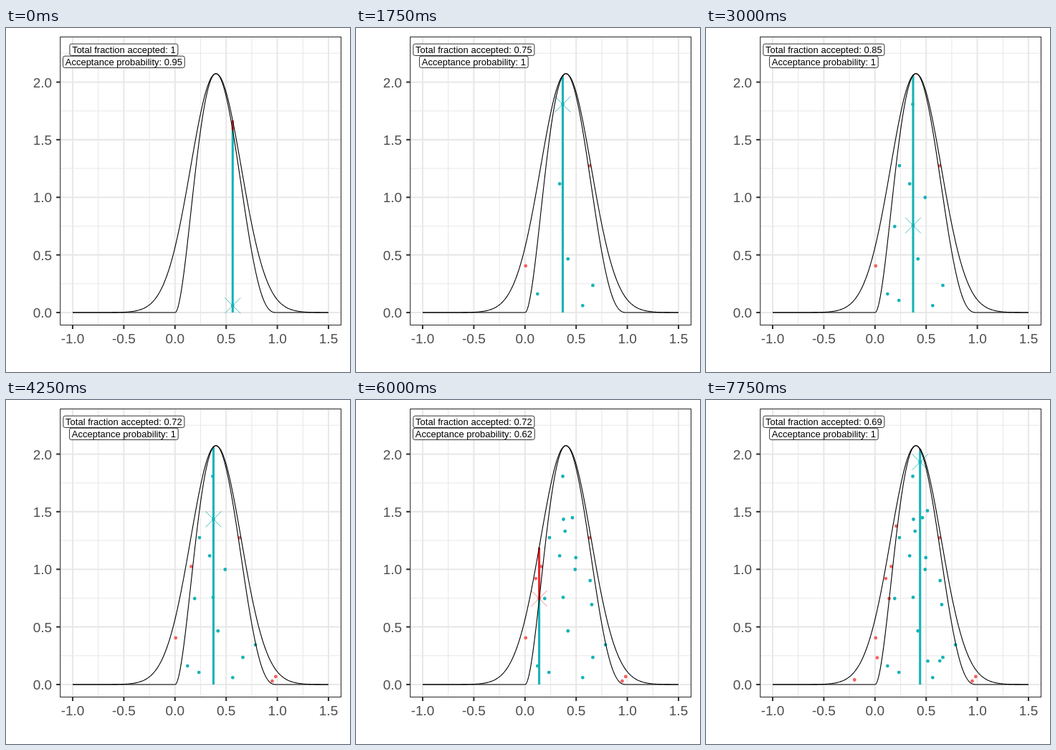
Recreate the animation shown at these times as an HTML page. Size 480 by 480 pixels, loop 8000 ms.

```html
<!DOCTYPE html>
<html lang="en">
<head>
<meta charset="utf-8">
<title>Rejection sampling</title>
<style>
  html, body { margin: 0; width: 100%; height: 100%; overflow: hidden; background: #fff; }
  svg { display: block; width: 100vw; height: 100vh; }
  text { font-family: "Liberation Sans", Arial, sans-serif; }
  .axis { font-size: 19px; fill: #4d4d4d; }
  .label { font-size: 13px; fill: #000; text-anchor: middle; }
</style>
</head>
<body>
<svg id="stage" viewBox="0 0 480 480"></svg>
<script>
const STEP = 250;
const TEAL = "#17b3b7", RED = "#f8605c", HOT = "#e8282d";
const PANEL = { x: 75.7, y: 12.5, width: 391.8, height: 402 };
const LABEL_X = 164.4;

// Proposals in order: position and height drawn under the envelope
const samples = [
  [.5637, .06], [.42, .465], [.0065, .405], [.339, 1.117],
  [.631, 1.273], [.1225, .161], [.663, .235], [.369, 1.807],
  [.2395, 1.275], [.49, .9985], [.1925, .7465], [.234, .105],
  [.3725, .756], [.159, 1.0245], [.786, .345], [.95, .03],
  [.984, .0685], [.376, 1.434], [.4635, 1.448], [.4965, 1.101],
  [.6365, .902], [.3915, 1.331], [.105, .9205], [.6525, .6935],
  [.1385, .7465], [-.2, .0405], [.0214, .233], [.633, .205],
  [.516, .2035], [.5125, 1.5085], [.208, 1.375], [.4405, 1.931]
];

const px = x => 235.8 + 142.8 * x;
const py = y => 397 - 160.75 * y;
const target = x => x > 0 && x < 1 ? 60 * x ** 2 * (1 - x) ** 3 : 0;
const envelope = x => 2.0736 * Math.exp(-((x - .4) ** 2) / .123);
const accepted = ([x, y]) => y <= target(x);

const stage = document.getElementById("stage");

function set(el, attrs) {
  for (const key in attrs) el.setAttribute(key, attrs[key]);
  return el;
}

function add(tag, attrs, parent = stage) {
  const el = document.createElementNS("http://www.w3.org/2000/svg", tag);
  return parent.appendChild(set(el, attrs));
}

function line(x1, y1, x2, y2, stroke, width) {
  return add("line", { x1, y1, x2, y2, stroke, "stroke-width": width });
}

function axisText(x, y, anchor, value) {
  add("text", { x, y, class: "axis", "text-anchor": anchor }).textContent = value.toFixed(1);
}

const left = PANEL.x, right = left + PANEL.width;
const top_ = PANEL.y, bottom = top_ + PANEL.height;
const vertical = (v, w) => line(px(v), top_, px(v), bottom, "#e8e8e8", w);
const horizontal = (v, w) => line(left, py(v), right, py(v), "#e8e8e8", w);

for (let v = -.75; v < 1.5; v += .5) vertical(v, 1.1);
for (let v = .25; v < 2.5; v += .5) horizontal(v, 1.1);
for (let v = -1; v <= 1.5; v += .5) {
  vertical(v, 2.1);
  line(px(v), bottom, px(v), bottom + 5.5, "#333", 2.1);
  axisText(px(v), 440, "middle", v);
}
for (let v = 0; v <= 2; v += .5) {
  horizontal(v, 2.1);
  line(left - 5.5, py(v), left, py(v), "#333", 2.1);
  axisText(64.2, py(v) + 7, "end", v);
}

const dots = samples.map(s => add("circle", {
  cx: px(s[0]), cy: py(s[1]), r: 2.4, fill: accepted(s) ? TEAL : RED
}));
const keepBar = line(0, 0, 0, 0, TEAL, 3.1);
const dropBar = line(0, 0, 0, 0, HOT, 3.1);
const cross = add("path", { fill: "none", "stroke-width": 1, "stroke-opacity": .8 });

function curve(fn) {
  let d = "";
  for (let i = 0; i <= 500; i++) {
    const x = -1 + i / 200;
    d += (i ? "L" : "M") + px(x).toFixed(2) + " " + py(fn(x)).toFixed(2);
  }
  add("path", { d, fill: "none", stroke: "#000", "stroke-width": 1.1 });
}
curve(envelope);
curve(target);

const clip = add("clipPath", { id: "panel" });
add("rect", PANEL, clip);
const labels = add("g", { "clip-path": "url(#panel)" });

function makeLabel(y) {
  const box = add("rect", {
    y, height: 16.3, rx: 2.6, fill: "#fff", stroke: "#000", "stroke-width": .8
  }, labels);
  const text = add("text", { x: LABEL_X, y: y + 12.8, class: "label" }, labels);
  return value => {
    text.textContent = value;
    const width = text.getComputedTextLength() + 6.4;
    set(box, { x: LABEL_X - width / 2, width });
  };
}
const showTotal = makeLabel(22.2);
const showChance = makeLabel(39.2);

add("rect", { ...PANEL, fill: "none", stroke: "#333", "stroke-width": 1.1 });

function draw(n) {
  const [x, y] = samples[n];
  const cx = px(x), cy = py(y), mid = py(target(x));
  const taken = samples.slice(0, n + 1).filter(accepted).length;
  dots.forEach((dot, i) => set(dot, { visibility: i <= n ? "visible" : "hidden" }));
  set(keepBar, { x1: cx, x2: cx, y1: py(0), y2: mid });
  set(dropBar, { x1: cx, x2: cx, y1: mid, y2: py(envelope(x)) });
  set(cross, {
    d: `M${cx - 11} ${cy - 11}l22 22m0 -22l-22 22`,
    stroke: accepted(samples[n]) ? TEAL : RED
  });
  showTotal("Total fraction accepted: " + Number((taken / (n + 1)).toFixed(2)));
  showChance("Acceptance probability: " + Number((target(x) / envelope(x)).toPrecision(2)));
}

let start = null, shown = 0;
function tick(now) {
  if (start === null) start = now;
  const n = Math.floor(Math.max(0, now - start) / STEP) % samples.length;
  if (n !== shown) draw(shown = n);
  requestAnimationFrame(tick);
}
draw(0);
requestAnimationFrame(tick);
</script>
</body>
</html>
```
